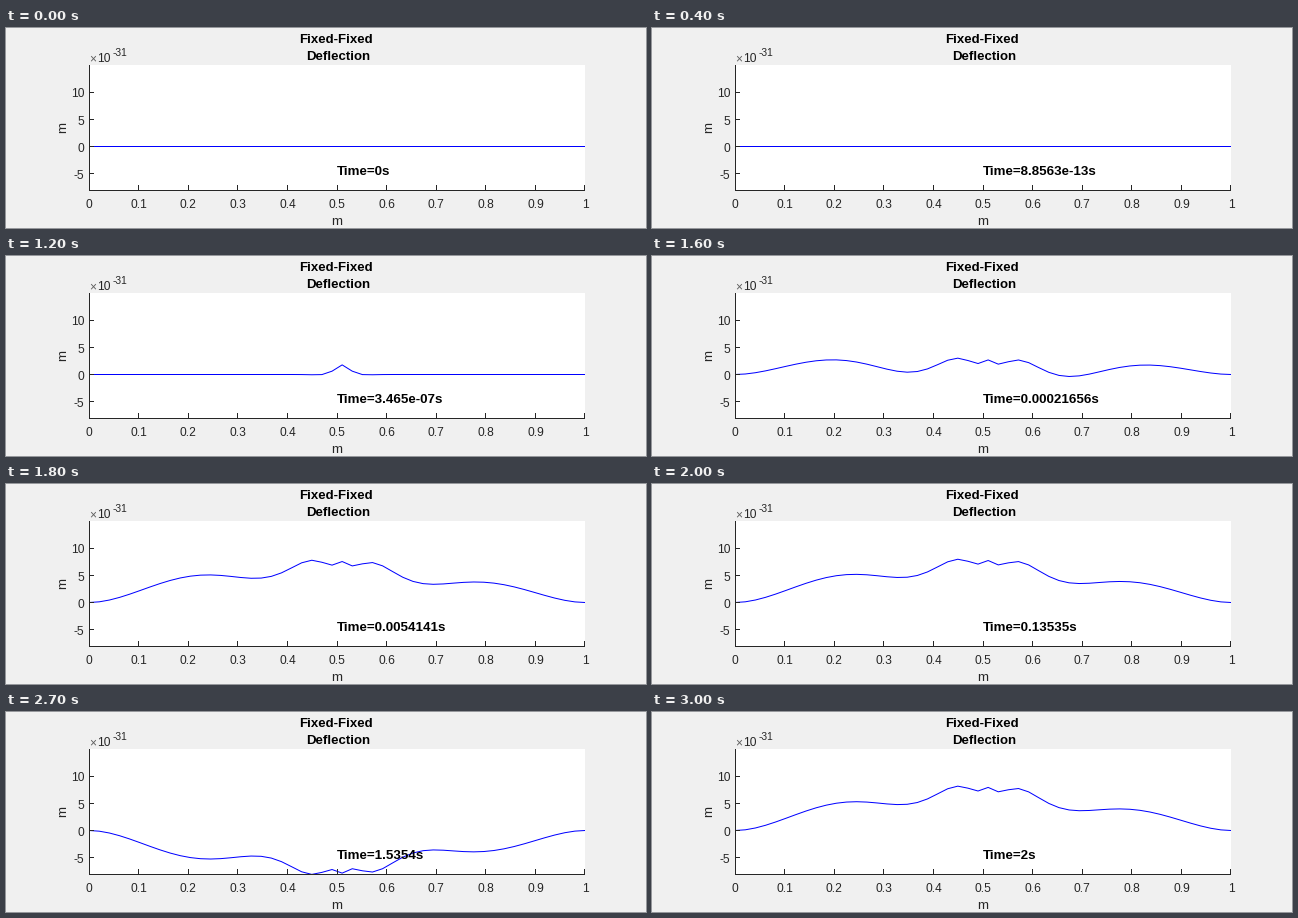
A matplotlib script for the animation above (3.1 s loop, 640 px wide and 200 px high).

```python
import math

import numpy as np
import matplotlib.pyplot as plt
from matplotlib.animation import FuncAnimation
from matplotlib.patches import Rectangle

plt.rcParams["font.family"] = "Liberation Sans"

W, H, DPI = 640, 200, 100
PX = 72 / DPI
FRAMES, INTERVAL = 31, 100
INK = "#262626"

# Clamped beam on 50 nodes, struck at one node near the middle
NODES, HIT = 50, 25
FIRST_STEP, MAX_STEP, T_END = 5.6771e-15, 0.2, 2.0
OMEGA_1 = 21300.0    # lowest natural frequency, rad/s
AMPLITUDE = 19.8     # first mode at the struck node


def time_steps():
    """Step sizes grow fivefold up to a limit; the last one ends at T_END."""
    steps, t, h = [], 0.0, FIRST_STEP
    while len(steps) < FRAMES - 1:
        h = min(h, MAX_STEP, T_END - t)
        steps.append(h)
        t += h
        h *= 5
    return np.array(steps)


def beam_modes():
    n = NODES - 2
    k = 6 * np.eye(n)
    for offset, value in ((1, -4), (2, 1)):
        k += value * (np.eye(n, k=offset) + np.eye(n, k=-offset))
    k[0, 0] = k[-1, -1] = 7
    lam, shapes = np.linalg.eigh(k)
    return OMEGA_1 * np.sqrt(lam / lam[0]), shapes


def solve():
    steps = time_steps()
    omega, shapes = beam_modes()
    hit = shapes[HIT - 1]
    gain = AMPLITUDE / hit[0] ** 2 * hit * OMEGA_1 / omega
    # The trapezoidal rule turns each mode by 2*atan(omega*h/2) per step
    turns = 2 * np.arctan(np.outer(steps, omega) / 2)
    phase = np.vstack([np.zeros_like(omega), np.cumsum(turns, axis=0)])
    w = np.zeros((FRAMES, NODES))
    w[:, 1:-1] = (gain * np.sin(phase)) @ shapes.T
    return np.concatenate([[0], np.cumsum(steps)]), w


def px_x(x):
    return 83.2 + 495.8 * x


def px_y(v):
    return 118.5 - 5.4375 * v


times, deflection = solve()
nodes = px_x(np.linspace(0, 1, NODES))

fig = plt.figure(figsize=(W / DPI, H / DPI), dpi=DPI, facecolor="#f0f0f0")
ax = fig.add_axes([0, 0, 1, 1])
ax.set_xlim(0, W)
ax.set_ylim(H, 0)
ax.axis("off")


def label(x, y, text, size=12, color=INK, ha="center", **kw):
    return ax.text(x, y, text, fontsize=size * PX, color=color, ha=ha,
                   va="baseline", zorder=5, **kw)


def rule(x, y, w=1, h=1):
    """Crisp bar whose top left pixel is the one holding (x, y)."""
    ax.add_patch(Rectangle((math.floor(x), math.floor(y)), w, h, fc=INK,
                           ec="none", lw=0, zorder=4))


ax.add_patch(Rectangle((83, 37), 496, 126, fc="white", ec="none", zorder=1))
rule(83, 37, h=126)
rule(83, 162, w=496)

for i in range(11):
    x = px_x(i / 10)
    rule(min(x, 578), 157, h=5)
    label(x, 180, f"{i / 10:g}")
for v in (-5, 0, 5, 10):
    y = px_y(v)
    rule(84, y, w=4)
    label(78.5, y + 5.2, str(v), ha="right")

label(330.2, 15.4, "Fixed-Fixed", 13.3, "black", weight="bold")
label(332.2, 32.4, "Deflection", 13.3, "black", weight="bold")
label(330.6, 197, "m", 13.2)
label(60, 99.5, "m", 13.2, rotation=90, rotation_mode="anchor")
label(83.2, 34, "×", color="#606060", ha="left")
label(91.2, 34, "10", ha="left")
label(106.3, 28, "-31", 10.3, ha="left")

clock = label(331, 147, "", 13.4, "black", ha="left", weight="bold")
curve, = ax.plot(nodes, px_y(deflection[0]), color="blue", lw=PX, zorder=3,
                 snap=False)
curve.set_clip_path(Rectangle((83, 36), 496, 128, transform=ax.transData))


def draw(i):
    curve.set_ydata(px_y(deflection[i]))
    clock.set_text(f"Time={times[i]:.5g}s")
    return curve, clock


anim = FuncAnimation(fig, draw, frames=FRAMES, interval=INTERVAL,
                     repeat=True, repeat_delay=0)
plt.show()
```
